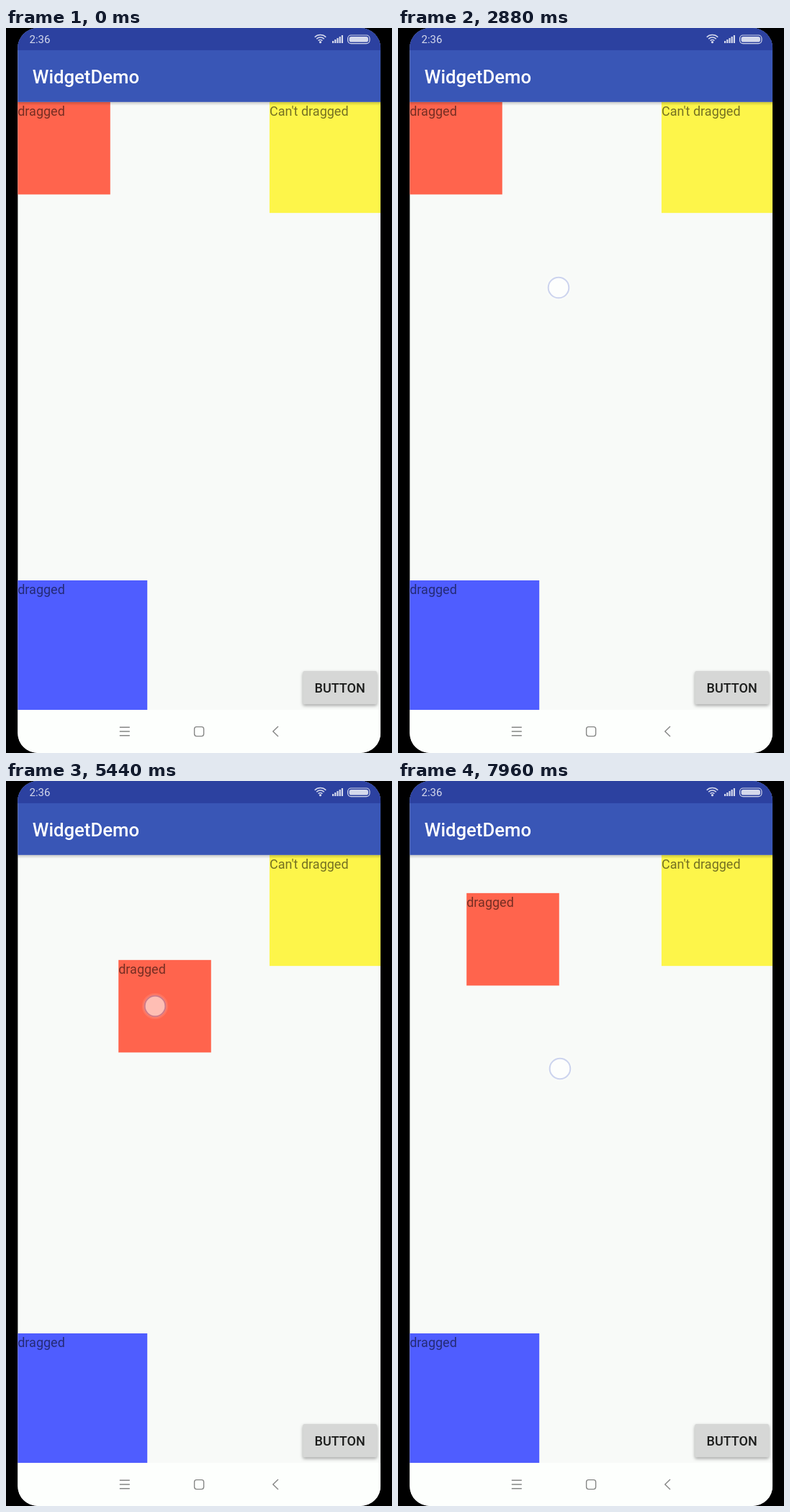
These frames come from a looping animation (536x1008 px, 8000 ms). An HTML page with a canvas:

```html
<!DOCTYPE html>
<html lang="en">
<head>
<meta charset="utf-8">
<title>WidgetDemo</title>
<style>
  html, body { margin: 0; width: 100%; height: 100%; overflow: hidden; background: #000; }
  canvas { display: block; }
</style>
</head>
<body>
<canvas id="stage" width="536" height="1008"></canvas>
<script>
const ctx = document.getElementById('stage').getContext('2d');
const LOOP = 8000, STEP = 40;
const LAG = 20, PRESS = 80, HOLD = 160;

// Layout in density-independent units on a 504 px wide screen
const DP = 9 / 7;
const LEFT = 16.2, WIDTH = 504, RIGHT = LEFT + WIDTH;
const STATUS = 24 * DP, TOP = 80 * DP, BOTTOM = 948;
const FONT = 14 * DP;

const mid = (a, b) => a.map((v, i) => (v + b[i]) / 2);

// The finger follows a quadratic curve; without a bend it moves evenly
function touch(start, length, from, to, drags = true, bend = mid(from, to)) {
  const at = t => {
    const u = Math.min(1, Math.max(0, (t - start) / length)), v = 1 - u;
    return from.map((a, i) => v * v * a + 2 * u * v * bend[i] + u * u * to[i]);
  };
  return { start, from, drags, at, down: start - PRESS, up: start + length + HOLD };
}

const touches = [
  touch(280, 860, [69, 167], [223, 361]),
  touch(1460, 920, [432, 182], [379, 324], false, [431, 280]),
  touch(2760, 200, [223, 361], [223, 361]),
  touch(4240, 1160, [67, 167], [207, 313], true, [159, 232]),
  touch(6120, 960, [211, 327], [272, 481], true, [272, 481]),
  touch(7640, 360, [140.7, 343.5], [235.5, 407])
];

// Every new drag starts over from the top left corner
function redAt(t) {
  const drag = touches.filter(d => d.drags && t >= d.start).pop();
  if (!drag) return [LEFT, TOP];
  const [x, y] = drag.at(t - LAG);
  return [LEFT + Math.round(x - drag.from[0]), TOP + Math.round(y - drag.from[1])];
}

function rect(x, y, w, h, color) {
  ctx.fillStyle = color;
  ctx.fillRect(x, y, w, h);
}

function round(x, y, w, h, r) {
  ctx.beginPath();
  ctx.roundRect(x, y, w, h, r);
}

function circle(x, y, r, from = 0, to = Math.PI * 2) {
  ctx.beginPath();
  ctx.arc(x, y, r, from, to);
}

function disc(x, y, r, color) {
  circle(x, y, r);
  ctx.fillStyle = color;
  ctx.fill();
}

function line(...pts) {
  ctx.beginPath();
  pts.forEach(([x, y]) => ctx.lineTo(x, y));
  ctx.stroke();
}

function text(str, x, y, size, color, weight = 400, align = 'left') {
  ctx.font = `${weight} ${size}px Roboto, sans-serif`;
  ctx.textAlign = align;
  ctx.fillStyle = color;
  ctx.fillText(str, x, y);
}

function box(x, y, dp, color, label) {
  rect(x, y, dp * DP, dp * DP, color);
  text(label, x, y + 1.056 * FONT, FONT, 'rgba(0,0,0,.54)');
}

function marker([x, y]) {
  disc(x, y, 18, 'rgba(255,255,255,.1)');
  disc(x, y, 16, 'rgba(255,255,255,.1)');
  disc(x, y, 13.5, 'rgba(255,255,255,.48)');
  circle(x, y, 14.3);
  ctx.strokeStyle = 'rgba(70,95,200,.26)';
  ctx.lineWidth = 2;
  ctx.stroke();
}

function appBar() {
  const shade = ctx.createLinearGradient(0, TOP, 0, TOP + 5);
  shade.addColorStop(0, 'rgba(0,0,0,.2)');
  shade.addColorStop(1, 'rgba(0,0,0,0)');
  rect(LEFT, TOP, WIDTH, 5, shade);
  rect(LEFT, 0, WIDTH, TOP, '#3956b6');
  text('WidgetDemo', LEFT + 16 * DP, 77, 20 * DP, '#fff', 500);
}

function statusBar() {
  const ink = '#d5d9ec';
  rect(LEFT, 0, WIDTH, STATUS, '#2c41a0');
  text('2:36', 32.5, 21.3, 15, ink);
  ctx.strokeStyle = ink;
  ctx.lineWidth = 1.6;
  for (let r = 4; r < 12; r += 3.5) {
    circle(436.5, 20.5, r, -Math.PI * 0.75, -Math.PI * 0.25);
    ctx.stroke();
  }
  disc(436.5, 19.7, 1.6, ink);
  for (let i = 0; i < 5; i++) {
    const h = 3 + i * 2;
    rect(453 + i * 3.2, 21 - h, 2.2, h, ink);
  }
  ctx.lineWidth = 1.2;
  round(474.6, 10, 30.4, 11.6, 4.5);
  ctx.stroke();
  round(476.6, 12, 26.4, 7.6, 2.8);
  ctx.fill();
}

function button() {
  const w = 80 * DP, h = 36 * DP;
  const x = RIGHT - 4 * DP - w, y = BOTTOM - 6 * DP - h;
  ctx.save();
  ctx.shadowColor = 'rgba(0,0,0,.35)';
  ctx.shadowBlur = 4;
  ctx.shadowOffsetY = 2;
  ctx.fillStyle = '#d6d7d6';
  round(x, y, w, h, 2 * DP);
  ctx.fill();
  ctx.restore();
  text('BUTTON', x + w / 2, 924, FONT, '#1b1c1b', 500, 'center');
}

function navBar() {
  rect(LEFT, BOTTOM, WIDTH, 60, '#fdfffd');
  ctx.strokeStyle = '#858685';
  ctx.lineWidth = 1.4;
  for (let i = -1; i <= 1; i++) line([157.8, 978 + i * 5.7], [171.8, 978 + i * 5.7]);
  round(261.6, 971.6, 13, 13, 3);
  ctx.stroke();
  line([378, 971], [370.8, 978], [378, 985]);
}

function draw(t) {
  rect(0, 0, 536, 1008, '#000');
  ctx.save();
  round(LEFT, 0, WIDTH, 1008, 28);
  ctx.clip();
  rect(LEFT, 0, WIDTH, 1008, '#f8faf8');
  box(...redAt(t), 100, '#ff644d', 'dragged');
  box(RIGHT - 120 * DP, TOP, 120, '#fdf54a', "Can't dragged");
  box(LEFT, BOTTOM - 140 * DP, 140, '#4f5dff', 'dragged');
  button();
  appBar();
  statusBar();
  navBar();
  touches.filter(d => t >= d.down && t < d.up).forEach(d => marker(d.at(t)));
  ctx.restore();
}

const start = performance.now();
function tick() {
  const t = (performance.now() - start) % LOOP;
  draw(Math.floor(t / STEP) * STEP);
  requestAnimationFrame(tick);
}
tick();
</script>
</body>
</html>
```
